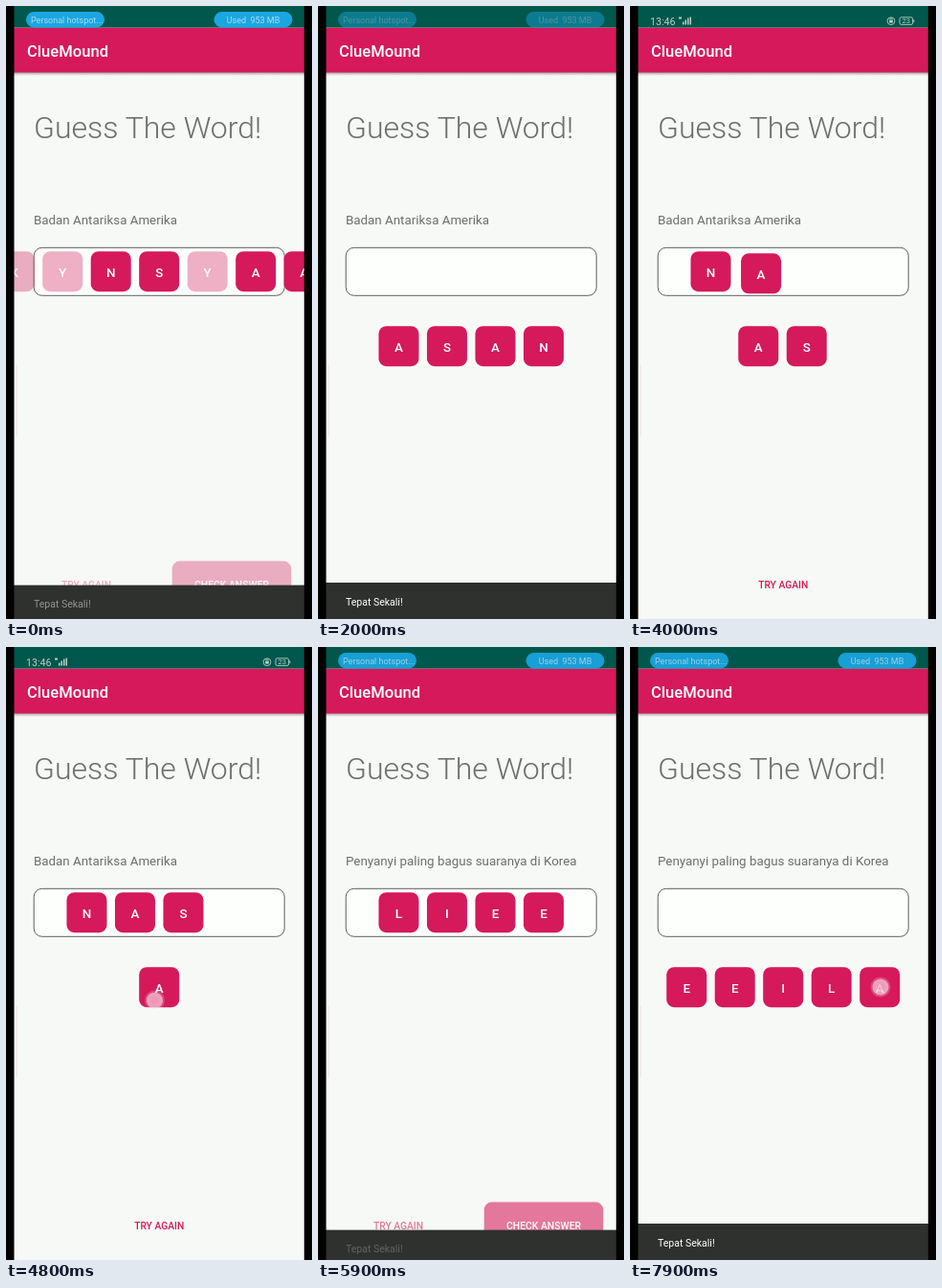
Recreate the animation shown at these times as an HTML page. Size 320x640 px, loop 8000 ms.

```html
<!DOCTYPE html>
<html lang="id">
<head>
<meta charset="utf-8">
<title>Word game</title>
<style>
html, body { margin: 0; width: 100%; height: 100%; overflow: hidden; background: #000; }
svg { display: block; width: 100%; height: 100%; font-family: Roboto, "Open Sans", sans-serif; }
.mid { text-anchor: middle; }
.med { font-weight: 500; }
</style>
</head>
<body>
<svg viewBox="0 0 320 640" xmlns="http://www.w3.org/2000/svg">
  <defs>
    <linearGradient id="shade" x1="0" y1="0" x2="0" y2="1">
      <stop offset="0" stop-color="#000" stop-opacity=".32"/>
      <stop offset="1" stop-color="#000" stop-opacity="0"/>
    </linearGradient>
  </defs>
  <rect width="320" height="640" fill="#f6f9f6"/>
  <rect x="10.5" y="375" width="1" height="74" fill="#efe2e6"/>

  <rect y="69" width="320" height="4" fill="url(#shade)"/>
  <rect y="22.5" width="320" height="47" fill="#d5195b"/>
  <rect width="320" height="22.5" fill="#00574b"/>
  <text class="med" x="22" y="53" font-size="16.6" fill="#fff">ClueMound</text>

  <g id="clock" fill="#b8d0ca">
    <text x="21" y="19.6" font-size="10.6">13:46</text>
    <path d="M51 11.5h3v2h-3zM55 16.5h1.5v3h-1.5zM57.5 14.5h1.5v5h-1.5zM60 12.5h1.5v7h-1.5zM62.5 11.5h1.5v8h-1.5z"/>
    <g fill="none" stroke="#b8d0ca" stroke-width=".9">
      <circle cx="273" cy="15.7" r="3.9"/>
      <rect x="282" y="11.8" width="13.6" height="7.6" rx="1.6"/>
      <path d="M296.8 14v3.2M271.9 15v-1a1.1 1.1 0 0 1 2.2 0v1"/>
    </g>
    <rect x="271.2" y="15" width="3.6" height="2.6"/>
    <text class="mid" x="288.8" y="18.4" font-size="7.5">23</text>
  </g>
  <g id="pills" font-size="9" fill="#a9def4">
    <rect x="21" y="6" width="82" height="16.5" rx="8.2" fill="#1ba6e2"/>
    <rect x="217.5" y="6" width="82" height="16.5" rx="8.2" fill="#1ba6e2"/>
    <text x="26" y="17.7">Personal hotspot...</text>
    <text class="mid" x="258.5" y="17.7" xml:space="preserve">Used  953 MB</text>
  </g>

  <text x="29" y="138" font-size="32" font-weight="300" fill="#6c6f6d">Guess The Word!</text>
  <text id="hint" x="29" y="228" font-size="13.35" fill="#6c6f6d"></text>
  <rect x="29.2" y="252.3" width="262" height="50" rx="8.5" fill="#fdfffd" stroke="#5c5f5d"/>
  <g id="tiles"></g>

  <g id="check">
    <rect x="173.7" y="579.6" width="124.6" height="48" rx="8" fill="#d5195b"/>
    <text class="mid med" x="236" y="607.6" font-size="10.4" fill="#fff">CHECK ANSWER</text>
  </g>
  <text id="retry" class="mid med" y="607.6" font-size="10.3" fill="#d5195b">TRY AGAIN</text>
  <g id="snack">
    <rect y="602" width="320" height="40" fill="#2f312f"/>
    <text id="snackText" x="29" y="625.8" font-size="10.5" fill="#fff">Tepat Sekali!</text>
  </g>
  <g id="touch">
    <circle r="10.5" fill="#fff" opacity=".2"/>
    <circle r="8.6" fill="#f6d3de" opacity=".65"/>
    <circle r="4" fill="#f08fb0" opacity=".45"/>
  </g>
  <path d="M0 0h8.5v640H0zM311.8 0h8.2v640h-8.2z"/>
</svg>
<script>
const LOOP = 8000, STEP = 300;
const BOX = 277.2, TRAY = 355.2;
const FIRST = -180, SECOND = 5765;   // moments a right answer is accepted
const PICKS = [2985, 3733, 4300, 4880];
const TOUCHES = [
  [2850, 2985, 231, 370], [3640, 3733, 205, 367], [4220, 4300, 185, 367],
  [4740, 4880, 155.5, 369], [5660, 5765, 240, 606], [7850, 8000, 262, 355]
];

const $ = id => document.getElementById(id);
const clamp = v => Math.min(1, Math.max(0, v));
const lerp = (a, b, k) => a + (b - a) * k;
const ramp = (t, from, len) => clamp((t - from) / len);
const smooth = k => 0.5 - 0.5 * Math.cos(Math.PI * k);
const glide = (t, from) => smooth(ramp(t, from, STEP));
const slot = (i, n) => 160.2 + (i - (n - 1) / 2) * 50.5;

// cubic-bezier(.4, 0, .2, 1)
function settle(x) {
  let lo = 0, hi = 1;
  for (let i = 0; i < 24; i++) {
    const s = (lo + hi) / 2, r = 1 - s;
    if (1.2 * r * r * s + 0.6 * r * s * s + s * s * s < x) lo = s; else hi = s;
  }
  return 3 * (1 - lo) * lo * lo + lo * lo * lo;
}

function makeTile() {
  const g = document.createElementNS("http://www.w3.org/2000/svg", "g");
  g.innerHTML = '<rect x="-21" y="-21" width="42" height="42" rx="8" fill="#d5195b"/>' +
    '<text class="mid med" y="5.6" font-size="13.4" fill="#fff"></text>';
  $("tiles").append(g);
  return g;
}

function drawTile(g, letter, x, y, alpha) {
  g.lastChild.textContent = letter;
  g.setAttribute("transform", `translate(${x} ${y})`);
  g.setAttribute("opacity", alpha);
}

// Stops [time, x, y] of the four lasting tiles; tiles are picked last to first.
function stopsFor(i) {
  const stops = [[-1e4, slot([5, 3, 6, 2][i], 7), BOX], [FIRST + STEP, slot(i, 4), TRAY]];
  PICKS.forEach((t, k) => {
    const picked = 3 - k;
    if (i < picked) stops.push([t, slot(i, picked), TRAY]);
    if (i === picked) stops.push([t, slot(k, 4), BOX]);
  });
  stops.push([SECOND + STEP, slot(i, 5), TRAY]);
  return stops;
}

const lasting = [0, 1, 2, 3].map(i => ({ g: makeTile(), stops: stopsFor(i), letters: "ASAN"[i] + "EEIL"[i] }));
const leaving = [["K", 0], ["Y", 1], ["Y", 4]].map(([letter, i]) => ({ g: makeTile(), letter, x: slot(i, 7) }));
const added = makeTile();

function drawSnack(t) {
  const start = t < SECOND ? FIRST + 10 : SECOND;
  const out = start + 3020;
  const shift = 1 - settle(ramp(t, start, 250)) + settle(ramp(t, out, 250));
  $("snack").setAttribute("transform", `translate(0 ${38 * shift})`);
  $("snackText").setAttribute("opacity", ramp(t, start + 100, 150) * (1 - ramp(t, out + 30, 180)));
}

function draw(t) {
  const second = t >= SECOND;
  $("hint").textContent = second ? "Penyanyi paling bagus suaranya di Korea" : "Badan Antariksa Amerika";

  for (const { g, stops, letters } of lasting) {
    let [, x, y] = stops[0];
    for (const [at, nx, ny] of stops.slice(1)) {
      const k = glide(t, at);
      x = lerp(x, nx, k);
      y = lerp(y, ny, k);
    }
    drawTile(g, letters[+second], x, y, 1);
  }
  const gone = 1 - glide(t, FIRST);
  for (const { g, letter, x } of leaving) drawTile(g, letter, x, BOX, gone);
  drawTile(added, "A", slot(4, 5), TRAY, glide(t, SECOND + 2 * STEP));

  const hide = 1 - glide(t, SECOND);
  const early = t < 1000;
  $("check").setAttribute("opacity", early ? gone : glide(t, PICKS[3] + STEP) * hide);
  $("retry").setAttribute("opacity", early ? gone : glide(t, PICKS[0] + STEP) * hide);
  $("retry").setAttribute("x", early ? 84 : lerp(160.2, 84, glide(t, PICKS[3])));

  const pills = 1 - ramp(t, 1650, 650) + ramp(t, 5350, 600) - ramp(t, 7850, 600);
  $("pills").setAttribute("opacity", pills);
  $("clock").setAttribute("opacity", ramp(t, 2300, 300) - ramp(t, 5050, 300));

  drawSnack(t);

  const tap = TOUCHES.find(([from, to]) => t >= from && t < to);
  $("touch").setAttribute("visibility", tap ? "visible" : "hidden");
  if (tap) $("touch").setAttribute("transform", `translate(${tap[2]} ${tap[3]})`);
}

const begin = performance.now();
function tick() {
  draw((performance.now() - begin) % LOOP);
  requestAnimationFrame(tick);
}
draw(0);
requestAnimationFrame(tick);
</script>
</body>
</html>
```
